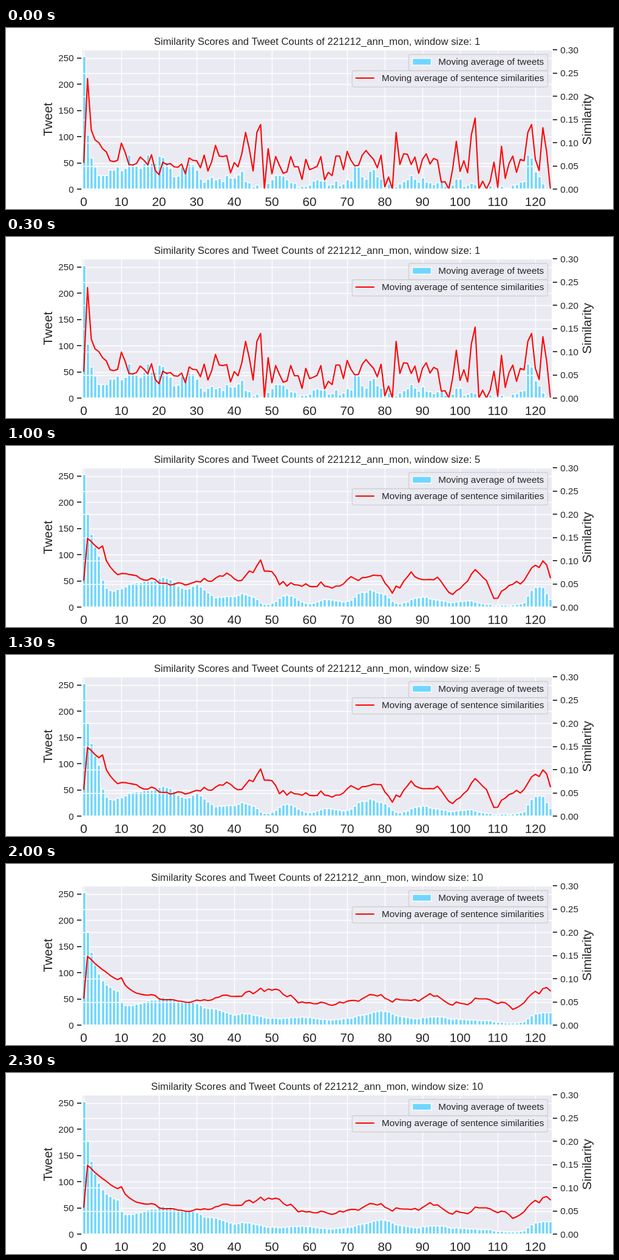
Recreate the animation shown at these times as an HTML page. Size 1000 by 300 pixels, loop 2.5 s.

```html
<!DOCTYPE html>
<html lang="en">
<head>
<meta charset="utf-8">
<title>Similarity scores and tweet counts</title>
<style>
html, body { margin: 0; width: 100%; height: 100%; overflow: hidden; background: #fff; }
svg { display: block; width: 1000px; height: 300px; }
text { font-family: "Liberation Sans", Arial, sans-serif; fill: #262626; }
</style>
</head>
<body>
<svg id="chart" viewBox="0 0 1000 300"></svg>
<script>
const WINDOWS = [1, 3, 5, 7, 10];
const HOLD = 500;
const AX = { left: 125, right: 900, top: 36, bottom: 267 };
const STEP = 6.2;
const FONT = { tick: 15.28, title: 16.67, label: 20.83 };

const tweets = [
  253, 104, 60, 43, 27, 27, 26, 37, 37, 43, 36, 40, 65, 47, 45, 40, 50, 65, 50, 50,
  63, 61, 52, 40, 24, 25, 43, 41, 48, 47, 37, 20, 14, 19, 23, 18, 21, 15, 26, 22,
  22, 28, 34, 15, 13, 5, 8, 2, 1, 12, 18, 27, 27, 25, 18, 13, 11, 3, 6, 6,
  8, 16, 18, 16, 16, 8, 9, 16, 7, 10, 18, 16, 44, 42, 24, 19, 35, 38, 24, 19,
  3, 10, 4, 5, 10, 15, 18, 26, 20, 14, 22, 14, 13, 9, 13, 15, 6, 2, 8, 20,
  20, 6, 8, 11, 9, 4, 3, 3, 7, 3, 3, 6, 2, 2, 8, 9, 14, 15, 65, 60,
  33, 24, 10, 4, 3
];

// Similarity in thousandths
const scores = [
  58, 238, 127, 106, 100, 87, 80, 61, 59, 62, 99, 79, 53, 52, 55, 69, 62, 52, 74, 40,
  31, 58, 53, 55, 48, 47, 54, 33, 67, 62, 61, 46, 73, 39, 59, 94, 71, 70, 72, 35,
  57, 48, 76, 122, 86, 39, 122, 139, 0, 87, 33, 70, 51, 34, 37, 70, 48, 48, 21, 64,
  42, 45, 49, 70, 20, 36, 29, 71, 71, 42, 81, 62, 50, 51, 73, 83, 73, 64, 46, 73,
  5, 26, 0, 122, 53, 76, 75, 53, 69, 34, 64, 76, 54, 66, 62, 15, 16, 0, 42, 103,
  38, 61, 35, 117, 153, 0, 17, 0, 17, 58, 4, 92, 23, 55, 71, 36, 64, 61, 122, 139,
  64, 40, 132, 80, 0
];

const chart = document.getElementById("chart");

function add(tag, attrs, parent = chart) {
  const el = document.createElementNS("http://www.w3.org/2000/svg", tag);
  for (const key in attrs) el.setAttribute(key, attrs[key]);
  parent.appendChild(el);
  return el;
}

function label(str, x, y, size, anchor = "start", turn = 0) {
  const el = add("text", { x, y, "font-size": size, "text-anchor": anchor });
  if (turn) el.setAttribute("transform", `rotate(${turn} ${x} ${y})`);
  el.textContent = str;
  return el;
}

const span = AX.bottom - AX.top;
const xAt = i => AX.left + STEP * (i + 0.5);
const tweetY = v => AX.bottom - v * span / 265.65;
const scoreY = v => AX.bottom - v * span / 300;
const snap = v => Math.round(v) + 0.5;
const hLine = y => `M${AX.left} ${snap(y)}H${AX.right}`;
const range = (n, f) => Array.from({ length: n }, (_, i) => f(i));

// Trailing mean over the last `size` values
const average = (list, size) => list.map((_, i) => {
  const part = list.slice(Math.max(0, i - size + 1), i + 1);
  return part.reduce((a, b) => a + b, 0) / part.length;
});

function barPath(values) {
  return values.map((v, i) => {
    const x = xAt(i);
    return `M${snap(x - 2.48)} ${snap(AX.bottom)}V${snap(tweetY(v))}H${snap(x + 2.48)}V${snap(AX.bottom)}Z`;
  }).join("");
}

const linePath = values =>
  "M" + values.map((v, i) => `${xAt(i).toFixed(2)} ${scoreY(v).toFixed(2)}`).join("L");

const poses = WINDOWS.map(size => ({
  title: `Similarity Scores and Tweet Counts of 221212_ann_mon, window size: ${size}`,
  bars: barPath(average(tweets, size)),
  line: linePath(average(scores, size))
}));

const box = { x: AX.left, y: AX.top, width: AX.right - AX.left, height: span };
const grid = { fill: "none", stroke: "#fff", "stroke-width": 1.39 };
const barStyle = { fill: "#70d6ff", stroke: "#fff", "stroke-width": 1.39 };
const lineStyle = {
  fill: "none", stroke: "#f00", "stroke-width": 2.08,
  "stroke-linejoin": "round", "stroke-linecap": "round"
};

add("rect", { width: 1000, height: 300, fill: "#fff" });
add("rect", { ...box, fill: "#eaeaf2" });
add("rect", box, add("clipPath", { id: "plot" }));
const plot = add("g", { "clip-path": "url(#plot)" });

const columns = range(13, i => `M${snap(xAt(i * 10))} ${AX.top}V${AX.bottom}`);
const rows = range(6, i => hLine(tweetY(i * 50)));
add("path", { ...grid, d: columns.concat(rows).join("") }, plot);
const bars = add("path", barStyle, plot);
add("path", { ...grid, d: range(7, i => hLine(scoreY(i * 50))).join("") }, plot);
const line = add("path", lineStyle, plot);

function tick(x, y) {
  add("path", { d: `M${x} ${Math.round(y)}h8`, stroke: "#262626", "stroke-width": 1.74 });
}

range(6, i => {
  const y = tweetY(i * 50);
  tick(117, y);
  label(i * 50, 111.8, y + 5.5, FONT.tick, "end");
});
range(7, i => {
  const y = scoreY(i * 50);
  tick(900, y);
  label((i * 0.05).toFixed(2), 913.2, y + 5.5, FONT.tick);
});
range(13, i => label(i * 10, xAt(i * 10), 295, FONT.label, "middle"));
add("rect", { ...box, fill: "none", stroke: "#fff", "stroke-width": 1.74 });

label("Tweet", 76, 151.5, FONT.label, "middle", -90);
label("Similarity", 963.5, 151.5, FONT.label, "middle", -90);
const title = label("", 512.5, 27.7, FONT.title, "middle");

function legend(x, y, str) {
  add("rect", {
    x, y, width: 892.5 - x, height: 27, rx: 3,
    fill: "#eaeaf2", stroke: "#ccc", "stroke-width": 1.39, opacity: 0.8
  });
  label(str, x + 48.8, y + 17.4, FONT.tick);
}

legend(663.5, 43.7, "Moving average of tweets");
add("rect", { ...barStyle, x: 669.5, y: 50.5, width: 31, height: 11 });
legend(570.3, 70.8, "Moving average of sentence similarities");
add("path", { ...lineStyle, d: "M576.5 83H606" });

const start = performance.now();
let shown = -1;

function draw(now) {
  const step = Math.floor(Math.max(0, now - start) / HOLD) % poses.length;
  if (step !== shown) {
    shown = step;
    title.textContent = poses[step].title;
    bars.setAttribute("d", poses[step].bars);
    line.setAttribute("d", poses[step].line);
  }
  requestAnimationFrame(draw);
}
draw(start);
</script>
</body>
</html>
```
